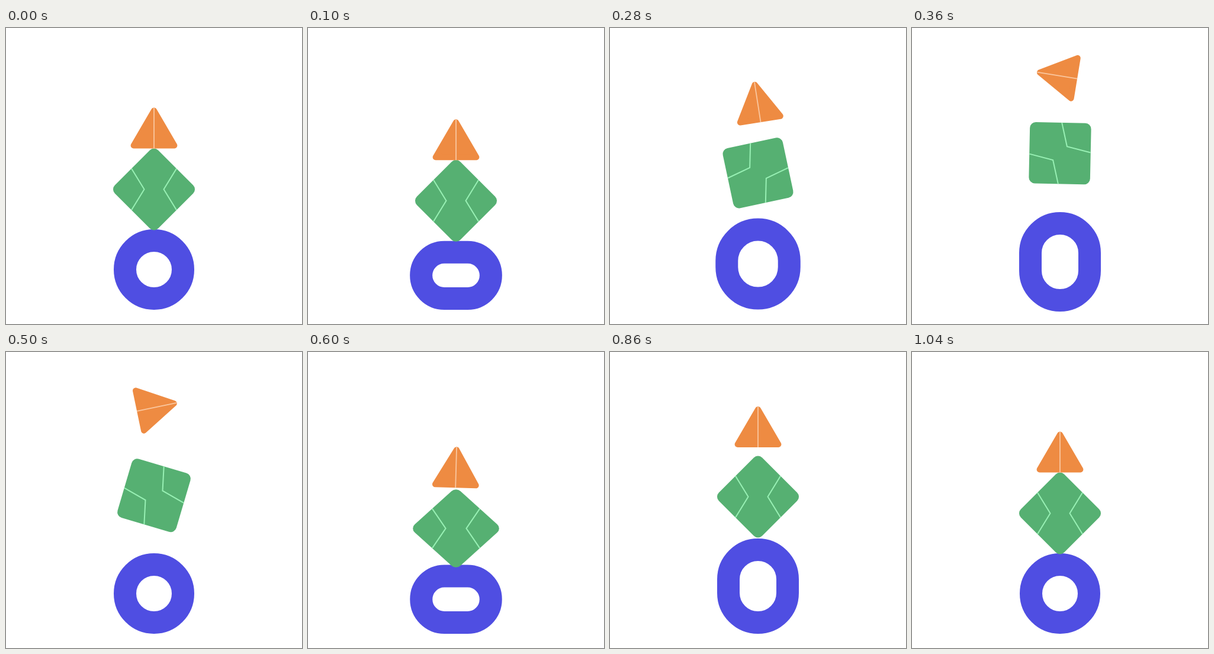
These frames come from a looping animation (500 px wide and 500 px high, 1080 ms). An HTML page:

```html
<!DOCTYPE html>
<html lang="en">
<head>
<meta charset="utf-8">
<title>Bouncing shapes</title>
<style>
@property --w { syntax: "<length>"; inherits: false; initial-value: 98px; }
@property --h { syntax: "<length>"; inherits: false; initial-value: 98px; }

html, body { margin: 0; width: 100%; height: 100%; overflow: hidden; background: #fff; }
svg { display: block; width: 100vw; height: 100vh; }

/* Every keyframe eases in and out unless it sets its own curve. */
.ring, .gem, .tip {
  animation-duration: 1080ms;
  animation-iteration-count: infinite;
  animation-timing-function: cubic-bezier(.37, 0, .63, 1);
}

.ring {
  x: calc(var(--w) / -2);
  y: calc(var(--h) / -2);
  width: var(--w);
  height: var(--h);
  rx: calc(min(var(--w), var(--h)) / 2);
  fill: none;
  stroke: #4f4ee2;
  stroke-width: 38px;
  animation-name: ring;
}
.gem { animation-name: gem-hop, gem-spin, gem-squash; }
.gem rect { fill: #56b072; }
.gem path { fill: none; stroke: #98f0b4; stroke-width: 2px; }
.tip { animation-name: tip-hop, tip-spin; }
.tip .body { fill: #ee8b42; stroke: #ee8b42; stroke-width: 10px; stroke-linejoin: round; }
.tip .fold { stroke: #fac79f; stroke-width: 1.8px; }

@keyframes ring {
  0%, 96.296%, 100% { --w: 98px; --h: 98px; translate: 250px 408px; }
  12.963% { --w: 122px; --h: 74px; translate: 250px 420px; animation-timing-function: cubic-bezier(.33, 0, .67, .6); }
  18.519% { --w: 116px; --h: 89px; translate: 250px 405.5px; animation-timing-function: cubic-bezier(.33, .4, .67, 1); }
  33.333% { --w: 100px; --h: 130px; translate: 250px 395px; }
  46.296% { --w: 98px; --h: 98px; translate: 250px 408px; }
  50.463% { --w: 98px; --h: 98px; translate: 250px 408px; animation-timing-function: cubic-bezier(.33, .5, .67, 1); }
  58.796% { --w: 122px; --h: 74px; translate: 250px 420px; animation-timing-function: cubic-bezier(.33, 0, .67, .65); }
  64.815% { --w: 112px; --h: 96px; translate: 250px 409px; animation-timing-function: cubic-bezier(.33, .65, .67, 1); }
  79.63% { --w: 100px; --h: 123px; translate: 250px 395.5px; }
}

@keyframes gem-hop {
  0%, 96.296%, 100% { translate: 250px 272.5px; }
  12.963% { translate: 250px 296px; animation-timing-function: cubic-bezier(.33, 0, .67, .6); }
  18.519% { translate: 250px 276.5px; animation-timing-function: cubic-bezier(.33, .33, .67, .63); }
  33.333% { translate: 250px 212px; animation-timing-function: cubic-bezier(.33, .67, .67, 1); }
  37.037% { translate: 250px 203.5px; }
  58.796% { translate: 250px 303px; animation-timing-function: cubic-bezier(.33, 0, .67, .63); }
  64.815% { translate: 250px 279px; animation-timing-function: cubic-bezier(.33, .6, .67, 1); }
  79.63% { translate: 250px 244.5px; }
}
@keyframes gem-spin {
  0%, 19.537% { rotate: 0deg; }
  52.407%, 100% { rotate: 360deg; }
}
@keyframes gem-squash {
  0%, 50.463% { scale: 1 1; }
  58.796% { scale: 1.08 .93; animation-timing-function: cubic-bezier(.33, 0, .67, .65); }
  64.815% { scale: 1.043 .963; animation-timing-function: cubic-bezier(.33, .65, .67, 1); }
  79.63%, 100% { scale: 1 1; }
}

@keyframes tip-hop {
  0%, 96.296%, 100% { translate: 250px 174px; }
  12.963% { translate: 250px 198px; animation-timing-function: cubic-bezier(.33, 0, .67, .63); }
  18.519% { translate: 250px 170px; animation-timing-function: cubic-bezier(.33, .31, .67, .55); }
  33.333% { translate: 250px 81.6px; animation-timing-function: cubic-bezier(.33, .47, .67, 1); }
  39.352% { translate: 250px 47px; }
  58.796% { translate: 250px 210px; animation-timing-function: cubic-bezier(.33, 0, .67, .6); }
  64.815% { translate: 250px 183.5px; animation-timing-function: cubic-bezier(.33, .5, .67, 1); }
  79.63% { translate: 250px 131.5px; }
}
@keyframes tip-spin {
  0%, 22.5% { rotate: 0deg; }
  57.13%, 100% { rotate: -360deg; }
}
</style>
</head>
<body>
<svg viewBox="0 0 500 500">
  <rect class="ring"/>
  <g class="gem">
    <rect x="-51.75" y="-51.75" width="103.5" height="103.5" rx="10" transform="rotate(45)"/>
    <path d="M-38-35L-16.5 0L-38 35M38-35L16.5 0L38 35"/>
  </g>
  <g class="tip">
    <path class="body" d="M0-34.5L34.4 24.5H-34.4Z"/>
    <path class="fold" d="M0-39V29.5"/>
  </g>
</svg>
</body>
</html>
```
